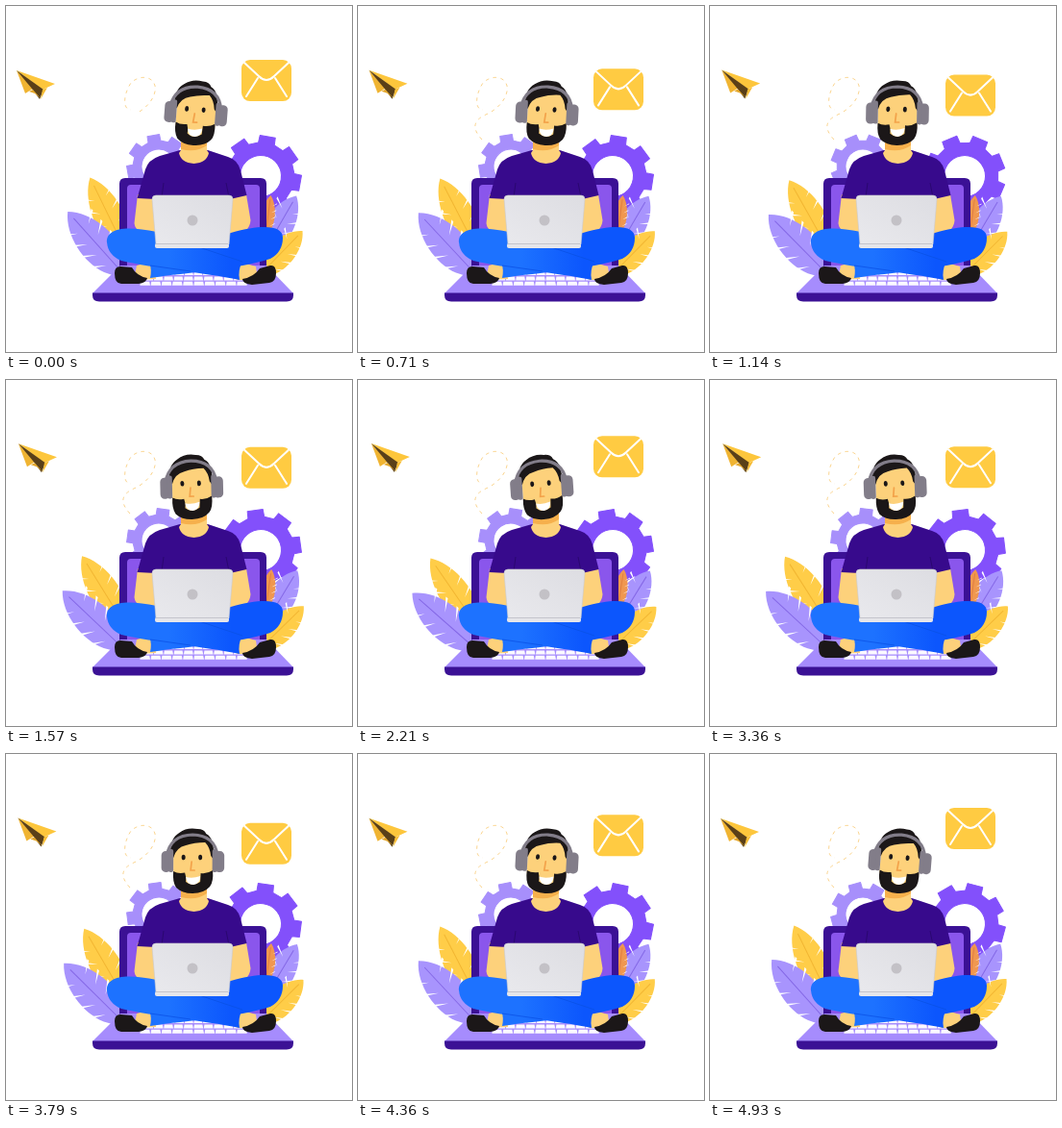
An HTML page that plays this animation: 360 px wide and 360 px high, repeating every 5000 ms.

```html
<!DOCTYPE html>
<html lang="en">
<head>
<meta charset="utf-8">
<title>Working online</title>
<style>
html, body { margin: 0; width: 100%; height: 100%; overflow: hidden; background: #fff; }
svg { display: block; width: 100vw; height: 100vh; }
</style>
</head>
<body>
<svg viewBox="0 0 360 360">
  <defs>
    <linearGradient id="denim" gradientUnits="userSpaceOnUse" x1="170" y1="0" x2="235" y2="0">
      <stop offset="0" stop-color="#1d72ff"/><stop offset="1" stop-color="#0c56fd"/>
    </linearGradient>
    <linearGradient id="lid" x1="0" y1="1" x2="1" y2="0">
      <stop offset="0" stop-color="#e9e9ed"/><stop offset="1" stop-color="#dddde2"/>
    </linearGradient>
    <clipPath id="reveal"><rect id="shade" x="115" y="65" width="50" height="45"/></clipPath>
  </defs>

  <g clip-path="url(#reveal)">
    <path fill="none" stroke="#fbd58f" stroke-width="1" stroke-dasharray="3.5 4.5"
      d="M129 139C118 127 120 119 133 113C149 106 157 92 155 83C152 72 138 72 130 80C122 92 121 108 130 108"/>
  </g>

  <g id="plane">
    <path fill="#fdc63c" d="M11 67L51 81L38 87Z"/>
    <path fill="#f0b432" d="M11 67L20 91L28 86Z"/>
    <path fill="#5a4018" d="M11 67L39 87L35 97L27 86Z"/>
    <path fill="#e3a72c" d="M28 87L36 96L30 91L24 89Z"/>
    <path fill="#f7bd36" d="M38 87L43 85L36 97Z"/>
  </g>

  <g id="mail">
    <rect x="245" y="56" width="52" height="43" rx="9" fill="#ffcb42"/>
    <path fill="none" stroke="#fff" stroke-width="2" stroke-linecap="round" stroke-linejoin="round"
      d="M248 59L263 73Q271 81 279 73L294 59M250 94L262 75M292 94L280 75"/>
  </g>

  <g id="gears"></g>
  <g id="leaves"></g>

  <g id="desk">
    <path fill="#3b1195" d="M118 290V185Q118 179 124 179H265Q271 179 271 185V290Z"/>
    <path fill="#8a56ec" d="M126 275V190Q126 186 130 186H260Q264 186 264 190V275Z"/>
    <path fill="#a68cfd" d="M119 270H271L299 299H90Z"/>
    <path fill="#3b1195" d="M90 298.5H299V301Q299 307.5 292 307.5H97Q90 307.5 90 301Z"/>
  </g>
  <g id="keys" fill="#fbf9ff"></g>

  <g id="body">
    <path fill="#fdd17b" d="M137 196L133.500 226Q134 232 140 235L160 246V196ZM250 196L254.500 223Q254 230 249 234L229 247V196Z"/>
    <path fill="#370a8c" d="M181 150H210L231 157Q241 160 244 171L250.500 197L233 201V236H156V201L136.500 200L145 170Q148 160 160 156Z"/>
    <path fill="#fdd17b" d="M182 136H209V150L211 153Q209 163 195.500 164Q182 163 180 153L182 150Z"/>
    <path fill="#f6b04c" d="M182 142L209 139V145Q198 153 182 149Z"/>
    <path fill="none" stroke="#2a0770" d="M162 199L164 184M232 199L229 184"/>
  </g>

  <g id="legs">
    <path fill="#fdd17b" d="M155 265L136 270L133 285L156 284ZM236 264L260 271L262 285L240 285Z"/>
    <path fill="#1b1718" d="M113 278Q113 271 119 271L131 272Q136 281 147 283Q146 288 138 289H120Q113 289 113 278Z"/>
    <path fill="#1b1718" d="M281 278Q281 269 275 270L264 273Q258 282 246 284Q246 289 256 290L274 288Q281 287 281 278Z"/>
    <g fill="url(#denim)">
      <path d="M288 241C288 229 269 226 234 236L149 267Q152 274 150 283C190 277 240 274 275 263Q288 256 288 241Z"/>
      <path d="M105 246C104 233 120 227 157 235L246 266Q241 275 243 285C205 277 154 273 120 265Q106 259 105 246Z"/>
    </g>
    <path fill="none" stroke="#0b52e6" stroke-width=".8" d="M198 250L246 266M150 270L192 276"/>
  </g>

  <g id="notebook">
    <path fill="url(#lid)" stroke="#c9c9cf" stroke-width=".6" d="M156 197H232Q236 197 236 201L232 248H156L152 201Q152 197 156 197Z"/>
    <circle cx="194" cy="223" r="5.500" fill="#c3c1c6"/>
    <rect x="155" y="247" width="77" height="5" rx="2" fill="#e6e6ea"/>
    <path stroke="#bcbcc4" stroke-width=".8" d="M156 247.500H231"/>
  </g>

  <g id="head">
    <path fill="#fdd17b" d="M174 100Q175 84 195 84Q215 84 215 102V124Q213 143 195 144Q177 143 174 124Z"/>
    <path fill="#1b1718" d="M171 104Q170 88 180 82Q188 76 199 78Q206 78 208 83Q217 87 216 110L213 106Q212 97 207 92Q196 92 187 95Q177 97 174 108Z"/>
    <path fill="#1b1718" d="M174 122Q179 125 186 123.500Q188 129 187 133Q194 139 202 133L202.500 124Q209 125 215 121Q216 133 212 138Q206 145 194 145Q183 145 177 139Q173 133 174 122Z"/>
    <path fill="#fff" d="M187 128Q194 130 202 127Q202 135 195 136Q188 136 187 128Z"/>
    <path fill="none" stroke="#f3a24a" stroke-width="1.700" stroke-linecap="round" d="M193 112L192 121H196"/>
    <g fill="#1b1718"><ellipse cx="184.500" cy="107.500" rx="2" ry="2.800"/><ellipse cx="202" cy="107.500" rx="2" ry="2.800"/></g>
    <path fill="none" stroke="#827d89" stroke-width="3.200" d="M167 106Q171 84.500 194 84Q217 84.500 220 106"/>
    <g fill="#827d89">
      <rect x="161.500" y="101" width="10" height="22" rx="4.500"/><rect x="169" y="99" width="5" height="24" rx="2"/>
      <rect x="217" y="101" width="10" height="22" rx="4.500"/><rect x="214.500" y="99" width="5" height="24" rx="2"/>
    </g>
  </g>
</svg>

<script>
const LOOP = 5000, STEPS = 70, TAU = Math.PI * 2;
const $ = id => document.getElementById(id);

function add(parent, tag, attrs) {
  const el = document.createElementNS('http://www.w3.org/2000/svg', tag);
  for (const k in attrs) el.setAttribute(k, attrs[k]);
  return parent.appendChild(el);
}

// Ring with eight tapered teeth, centred on the local zero point.
function gear(x, y, tip, root, hole, color, spin, start) {
  const pts = [];
  for (let i = 0; i < 8; i++)
    for (const [off, r] of [[-14, root], [-11, tip], [11, tip], [14, root]]) {
      const a = (i * 45 + off) * TAU / 360;
      pts.push((r * Math.sin(a)).toFixed(2) + ' ' + (-r * Math.cos(a)).toFixed(2));
    }
  const d = `M${pts.join('L')}ZM${-hole} 0a${hole} ${hole} 0 1 0 ${2 * hole} 0a${hole} ${hole} 0 1 0 ${-2 * hole} 0Z`;
  const el = add($('gears'), 'path', {
    d, fill: color, stroke: color, 'stroke-width': 1, 'stroke-linejoin': 'round', 'fill-rule': 'evenodd'
  });
  return { el, x, y, spin, start };
}

// Pointed leaf growing from (x, y) to (tx, ty), with slits cut in from the edge.
function leaf(x, y, tx, ty, w, color, rib, sway) {
  const len = Math.hypot(tx - x, ty - y);
  const g = add($('leaves'), 'g', {});
  let outline = '', slits = '';
  for (const s of [1, -1]) {
    outline += `M0 ${-len}C${s * w} ${-len * 0.82} ${s * w * 1.25} ${-len * 0.45} ${s * w * 0.75} ${-len * 0.22}Q${s * w * 0.3} ${-len * 0.05} 0 0Z`;
    for (const u of [0.26, 0.42, 0.58, 0.74]) {
      const y0 = -len * u, x0 = s * w * 1.1;
      slits += `M${x0} ${y0 - w * 0.55}L${s * w * 0.4} ${y0}L${x0} ${y0 - w * 0.4}Z`;
    }
  }
  add(g, 'path', { d: outline, fill: color });
  add(g, 'path', { d: slits, fill: '#fff' });
  add(g, 'path', { d: `M0 ${-len * 0.9}V0`, stroke: rib, 'stroke-width': 1 });
  return { el: g, x, y, angle: Math.atan2(tx - x, y - ty) * 360 / TAU, sway };
}

const LILAC = '#a894fd', LILAC_RIB = '#8468e6', GOLD = '#ffcd48', GOLD_RIB = '#f2b632';
const gears = [
  gear(159, 167, 33.5, 27, 18, '#a78ffb', 1, -10),
  gear(265, 177, 42.5, 35, 21.5, '#8350fb', -1, 10)
];
const leaves = [
  leaf(128, 262, 81, 182, 16, GOLD, GOLD_RIB, 4.5),
  leaf(126, 283, 60, 218, 18.5, LILAC, LILAC_RIB, 3.6),
  leaf(266, 260, 303, 198, 15, LILAC, LILAC_RIB, -0.8),
  leaf(262, 282, 309.5, 235, 14, GOLD, GOLD_RIB, -1.2),
  leaf(270, 240, 276, 197, 7, '#f0974f', '#e2803f', -0.8)
];

for (let row = 0; row < 3; row++)
  for (let i = 0; i < 10; i++) {
    const y = 276 + row * 5.4, edge = k => 195 + (k - 5) * (9.6 + row * 0.8);
    add($('keys'), 'path', { d: `M${edge(i) + 1} ${y}H${edge(i + 1) - 1}l.8 4H${edge(i) + 0.4}Z` });
  }

function draw() {
  const p = Math.floor(performance.now() % LOOP / LOOP * STEPS) / STEPS;
  const sway = Math.cos(TAU * p);
  const bob = 8 - 8 * Math.cos(2 * TAU * (p + 0.01));

  $('head').setAttribute('transform', `rotate(${4.4 * sway} 195 155)`);
  $('mail').setAttribute('transform', `translate(0 ${bob})`);
  $('plane').setAttribute('transform', `translate(${1.5 - 1.5 * sway} ${0.5 * sway - 0.5})`);
  $('shade').setAttribute('height', 45 + 32 * Math.min(1, p * 2 % 1 / 0.25));
  for (const g of gears)
    g.el.setAttribute('transform', `translate(${g.x} ${g.y}) rotate(${g.start + g.spin * 360 * p})`);
  for (const l of leaves)
    l.el.setAttribute('transform', `translate(${l.x} ${l.y}) rotate(${l.angle + l.sway * sway})`);
  requestAnimationFrame(draw);
}
draw();
</script>
</body>
</html>
```
